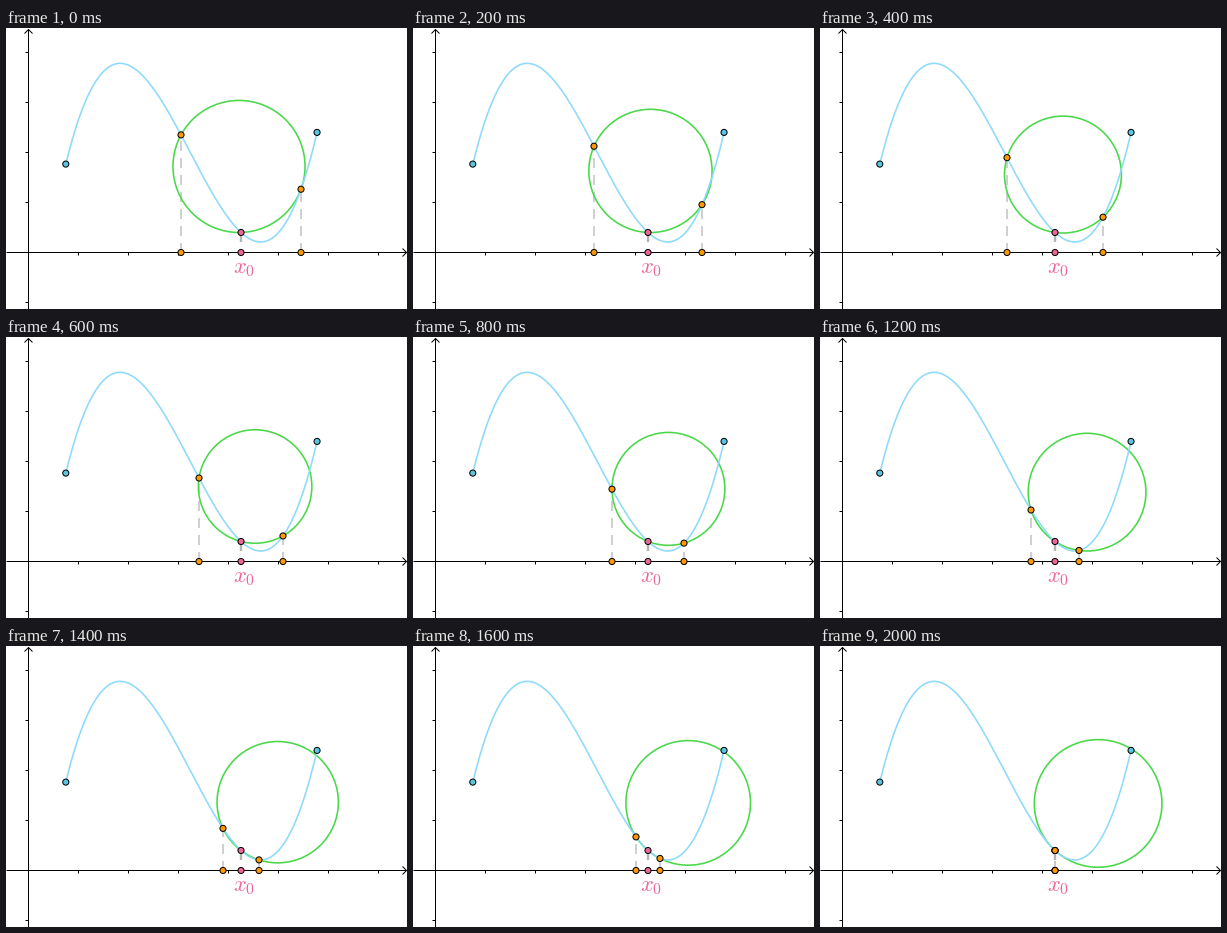
These frames come from a looping animation (401x281 px, 2100 ms). A matplotlib script:

```python
import numpy as np
import matplotlib.pyplot as plt
from matplotlib.animation import FuncAnimation
from matplotlib.patches import Circle

W, H, DPI = 401, 281, 64
OX, OY, UNIT = 22.5, 224.5, 50
FRAMES, STEP = 21, 100
X0, H_MAX = 4.25, 1.2
DASH, GAP = 10, 7

BLUE, GREEN = "#8edafb", "#4ad84a"
GRAY, DARK_GRAY = "#c8c8c8", "#b4b4b4"
DOT_BLUE, ORANGE, PINK = "#5bc4e0", "#ff9900", "#ee6699"

plt.rcParams["mathtext.fontset"] = "cm"


def px(n):
    """Pixels to points."""
    return n * 72 / DPI


def f(x):
    u = x - 3.2375
    return 1.997 + 0.322 * u**3 - 1.907 * u


def to_px(x, y):
    return OX + UNIT * x, OY - UNIT * y


def circle_through(a, b, c):
    """Centre and radius of the circle through three points."""
    (ux, uy), (vx, vy) = np.subtract(b, a), np.subtract(c, a)
    d = 2 * (ux * vy - uy * vx)
    u2, v2 = ux**2 + uy**2, vx**2 + vy**2
    dx, dy = (vy * u2 - uy * v2) / d, (ux * v2 - vx * u2) / d
    return (a[0] + dx, a[1] + dy), np.hypot(dx, dy)


fig = plt.figure(figsize=(W / DPI, H / DPI), dpi=DPI, facecolor="white")
ax = fig.add_axes([0, 0, 1, 1])
ax.set(xlim=(0, W), ylim=(H, 0))
ax.axis("off")


def stroke(xs, ys, color="black", width=1.0, z=4):
    return ax.plot(xs, ys, color=color, lw=px(width), zorder=z,
                   solid_capstyle="butt")[0]


def hairline(xs, ys):
    """Straight black line; pixel snapping moves it half a pixel back."""
    return stroke(np.subtract(xs, 0.5), np.subtract(ys, 0.5))


def dot(x, y, color, z):
    return ax.add_patch(Circle((x, y), 3.05, fc=color, ec="black",
                               lw=px(1), zorder=z))


def dashed(color, width, z):
    return ax.plot([], [], color=color, lw=px(width), zorder=z,
                   ls=(0, (DASH / width, GAP / width)),
                   dash_capstyle="butt")[0]


# axes with ticks and arrowheads
hairline([0, 400.5], [OY, OY])
hairline([OX, OX], [H, 1])
stroke([396.5, 400.5, 396.5], [OY - 4, OY, OY + 4])
stroke([OX - 4, OX, OX + 4], [5.5, 1.5, 5.5])
for i in range(1, 8):
    hairline([OX + UNIT * i] * 2, [OY, OY + 3])
for i in (-1, 1, 2, 3, 4):
    hairline([OX - 3, OX], [OY - UNIT * i] * 2)

# curve with its end points
xs = np.linspace(0.746, 5.771, 300)
stroke(*to_px(xs, f(xs)), BLUE, 1.6, 6)
for x in xs[[0, -1]]:
    dot(*to_px(x, f(x)), DOT_BLUE, 8)

ring = ax.add_patch(Circle((0, 0), 1, fill=False, ec=GREEN, lw=px(1.6), zorder=5))

# the fixed line is dashed downwards, the moving ones upwards
mid = to_px(X0, f(X0))
dashed(DARK_GRAY, 2.4, 3).set_data([mid[0]] * 2, [mid[1], OY])
dot(*mid, PINK, 8)
dot(mid[0], OY, PINK, 8)
ax.text(227, 245, "$x_0$", color=PINK, fontsize=px(22.5), va="baseline", zorder=7)

sides = [(sign, dashed(GRAY, 1.7, 2), dot(0, 0, ORANGE, 9), dot(0, 0, ORANGE, 9))
         for sign in (-1, 1)]


def update(k):
    h = max(H_MAX * (1 - k / (FRAMES - 1)), 1e-3)
    ends = []
    for sign, line, top, foot in sides:
        p = to_px(X0 + sign * h, f(X0 + sign * h))
        line.set_data([p[0], p[0]], [OY, p[1]])
        top.center = p
        foot.center = p[0], OY
        ends.append(p)
    ring.center, ring.radius = circle_through(ends[0], mid, ends[1])
    return []


anim = FuncAnimation(fig, update, frames=FRAMES, interval=STEP,
                     repeat=True, repeat_delay=0)
plt.show()
```
